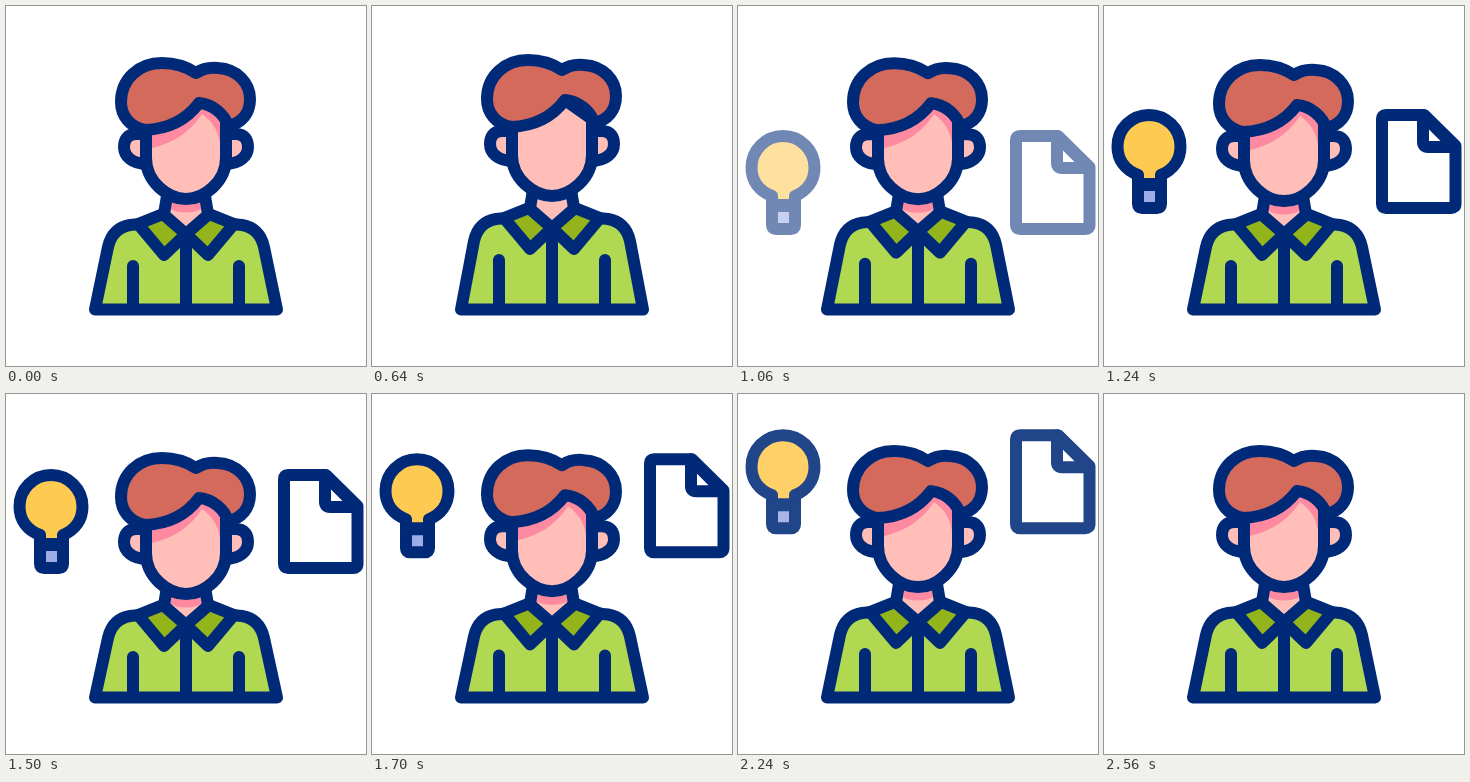
Write an HTML page that moves like this. It is 360 px wide and 360 px high and loops after 3.28 s.

```html
<!DOCTYPE html>
<html lang="en">
<head>
<meta charset="utf-8">
<title>Person with ideas</title>
<style>
  html, body { margin: 0; width: 100%; height: 100%; overflow: hidden; background: #fff; }
  svg { display: block; width: 100%; height: 100%; }
  .line { stroke: #002a78; stroke-width: 12; stroke-linecap: round; stroke-linejoin: round; }
</style>
</head>
<body>
<svg viewBox="0 0 360 360">
  <g id="icons" class="line" fill="#fff" opacity="0">
    <path fill="#ffca52" d="M34 75V66C21 61 13.500 51 13.500 37.500A31.500 31.500 0 0 1 76.500 37.500C76.500 51 69 61 57 66V75Z"/>
    <path fill="#9dabe6" d="M34 76H57V95Q57 99 53 99H38Q34 99 34 95Z"/>
    <path d="M282 6H320L351.500 37V95Q351.500 99 347 99H282Q278 99 278 95V10Q278 6 282 6Z"/>
    <path d="M319 6V33Q319 38 324 38H351Z"/>
  </g>

  <g class="line">
    <path id="shirt" fill="#b0d850"/>
    <path id="seams" fill="none"/>
  </g>

  <path id="skin" fill="#ffbfb8" d="M162 178L157 208L180 228L203 208L198 178Z"/>
  <path id="chinShade" class="shade" fill="#fd8aa0" d="M160 188H200V201Q180 212 160 201Z"/>
  <g id="neck" class="line">
    <path fill="none" d="M163 178L158 208M197 178L202 208"/>
    <g fill="#93b41a">
      <path id="collar" d="M157 208L132 218L158 249L180 228Z"/>
      <use href="#collar" transform="translate(360) scale(-1 1)"/>
    </g>
  </g>

  <g id="head">
    <g class="line" fill="#ffbfb8">
      <path id="ear" d="M141 128H130C121 128 118 134 118 141C118 150 126 158 141 158Z"/>
      <use href="#ear" transform="translate(360) scale(-1 1)"/>
      <path d="M140 122V152C140 176 162 193 180 193S220 176 220 152V116L193 97Z"/>
    </g>
    <path class="shade" fill="#fd8aa0" d="M146 120L192 97L214 112V137C212 124 206 115 196 108C184 126 168 137 146 142Z"/>
    <path class="line" fill="#d46a5c" d="M139 124C124 121 115 110 115 96C115 73 133 57 156 57C170 57 181 61 190 67C196 63 204 61 212 62C231 63 244 77 244 93C244 107 236 117 222 120C219 109 207 98 193 97C181 113 163 123 139 124Z"/>
  </g>
</svg>
<script>
const LOOP = 3280;
const $ = id => document.getElementById(id);
const shades = document.querySelectorAll('.shade');

// Each track lists [time, value] pairs.
const headTrack = [[480, 0], [640, -3], [730, -5], [920, 2], [1100, 0], [1240, 2], [1500, 7], [1900, 1], [2400, 0]];
const bodyTrack = [[480, 0], [640, -6], [920, -4], [1240, 0], [1500, 3], [1900, 0], [2400, 0]];
const iconTrack = [[880, 146], [920, 141], [1240, 103], [1500, 75], [1900, 47], [2080, 39.5], [2400, 33]];

const ramp = (t, a, b) => Math.min(1, Math.max(0, (t - a) / (b - a)));

// Smooth curve through the points, level at turning points.
function follow(track, t) {
  const last = track.length - 1;
  if (t <= track[0][0]) return track[0][1];
  if (t >= track[last][0]) return track[last][1];
  const i = track.findIndex(p => p[0] > t) - 1;
  const slope = k => (track[k + 1][1] - track[k][1]) / (track[k + 1][0] - track[k][0]);
  const tangent = k => {
    if (k === 0 || k === last) return 0;
    const a = slope(k - 1), b = slope(k);
    return a * b > 0 ? 2 * a * b / (a + b) : 0;
  };
  const [t0, y0] = track[i], [t1, y1] = track[i + 1];
  const w = t1 - t0, u = (t - t0) / w, v = 1 - u;
  return y0 * (1 + 2 * u) * v * v + y1 * (3 - 2 * u) * u * u
       + w * (tangent(i) * u * v * v - tangent(i + 1) * u * u * v);
}

const shift = (id, y) => $(id).setAttribute('transform', `translate(0 ${y})`);

function draw(now) {
  const t = now % LOOP;
  const h = follow(headTrack, t);
  const b = follow(bodyTrack, t);

  shift('head', h);
  shift('chinShade', h);
  shift('skin', b);
  shift('neck', b);
  $('shirt').setAttribute('d',
    `M89 303.500L102 ${241 + b}C105 ${228 + b} 112 ${221 + b} 124 ${219 + b}L134 ${218 + b}L158 ${209 + b}H202` +
    `L226 ${218 + b}L236 ${219 + b}C248 ${221 + b} 255 ${228 + b} 258 ${241 + b}L271 303.500Z`);
  $('seams').setAttribute('d', `M127 ${260 + b}V303M180 ${228 + b}V303M233 ${260 + b}V303`);

  const shade = 1 - ramp(t, 500, 580) + ramp(t, 740, 860);
  shades.forEach(s => s.setAttribute('opacity', shade));

  shift('icons', follow(iconTrack, t));
  $('icons').setAttribute('opacity', ramp(t, 888, 1200) * (1 - ramp(t, 2200, 2520)));
}

const start = performance.now();
function tick() {
  draw(performance.now() - start);
  requestAnimationFrame(tick);
}
tick();
</script>
</body>
</html>
```
